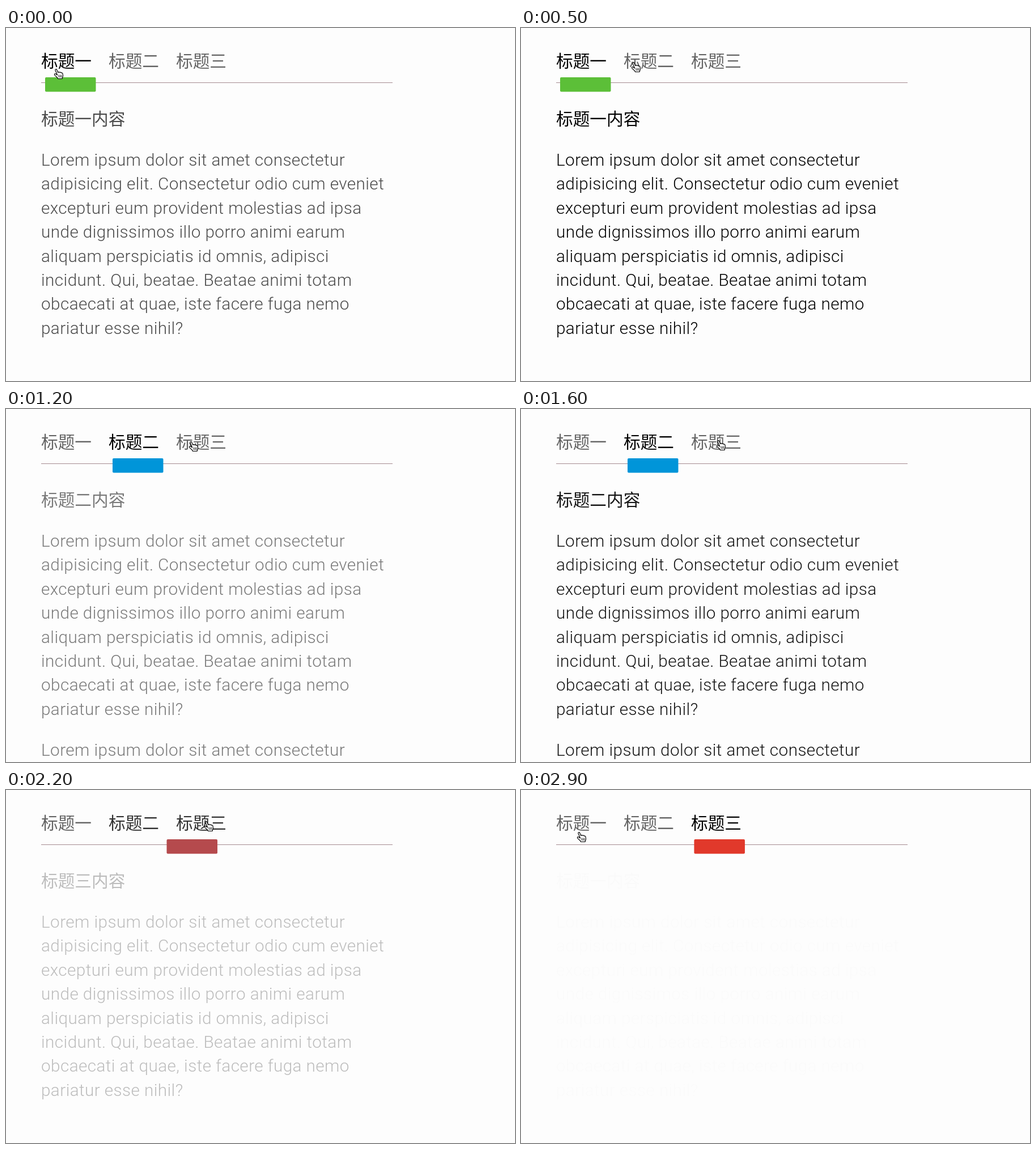
Animation of 898x623 px, one loop 3 s. Source, as an HTML page:

```html
<!DOCTYPE html>
<html lang="zh">
<head>
<meta charset="utf-8">
<title>Tabs</title>
<style>
  html, body { margin: 0; width: 100%; height: 100%; overflow: hidden; background: #fdfdfd; }
  svg { display: block; }
  text { font: 300 29.7px "Noto Sans CJK SC", "Noto Sans CJK", sans-serif; }
  .latin { font-family: Roboto, "Open Sans", sans-serif; letter-spacing: .42px; }
</style>
</head>
<body>
<svg id="stage" width="898" height="623" viewBox="0 0 898 623">
  <g id="tabs"></g>
  <path d="M62 96.5H682" stroke="#a58b90"/>
  <rect id="bar" y="87" width="89.5" height="25.6" rx="2"/>
  <text id="heading" x="62" y="171.3"></text>
  <g id="body"></g>
  <g id="hand" stroke="#000" stroke-width="1.2" stroke-linejoin="round" stroke-linecap="round">
    <path fill="#fff" d="M-3 .5L-6-6.3C-6.6-8.4-4-9-3.3-7.2L-1.3-2.6C-.6-3.9 1.2-3.6 1.6-2.4C2.5-3.5 4-3 4.4-1.7C5.5-2.4 6.8-1.6 7-.3L7.5 3.5L6 8.5H-1.5L-2.2 6.7L-6.7 2.6C-8.6 .8-7-1-5.2 .1L-2.6 2Z"/>
    <path fill="none" stroke-width=".9" d="M-.3 2L.5 6M2.2 2L2.8 6M4.6 2L4.9 6"/>
  </g>
</svg>
<script>
const LOOP = 3000, STEP = 100;
const BAR_MS = 500, FADE_MS = 1000;
const PITCH = 119, LINE = 42.4;
const DIM = 0.6;

const numerals = ['一', '二', '三'];
const colors = [[92, 191, 56], [0, 149, 217], [226, 56, 43]];
const lines = [
  'Lorem ipsum dolor sit amet consectetur',
  'adipisicing elit. Consectetur odio cum eveniet',
  'excepturi eum provident molestias ad ipsa',
  'unde dignissimos illo porro animi earum',
  'aliquam perspiciatis id omnis, adipisci',
  'incidunt. Qui, beatae. Beatae animi totam',
  'obcaecati at quae, iste facere fuga nemo',
  'pariatur esse nihil?'
];

// Time of each click, previous tab, chosen tab
const clicks = [[-700, 2, 0], [683, 0, 1], [1950, 1, 2], [2893, 2, 0]];

// Pointer stops: time, x, y
const stops = [
  [0, 93, 81], [450, 203, 69], [850, 203, 69], [1200, 331, 66],
  [1600, 353, 64], [1900, 358, 64], [2300, 358, 64], [2800, 107, 83], [3000, 107, 83]
];

const $ = id => document.getElementById(id);
const clamp = v => Math.max(0, Math.min(1, v));
const mix = (a, b, p) => a + (b - a) * p;
const smooth = p => p * p * (3 - 2 * p);

// cubic-bezier(.25, .1, .25, 1)
function ease(x) {
  const curve = (a, b, s) => 3 * a * s * (1 - s) ** 2 + 3 * b * s * s * (1 - s) + s ** 3;
  let lo = 0, hi = 1;
  for (let i = 0; i < 24; i++) {
    const mid = (lo + hi) / 2;
    if (curve(.25, .25, mid) < x) lo = mid; else hi = mid;
  }
  return curve(.1, 1, lo);
}

function addText(parent, str, x, y, cls) {
  const el = document.createElementNS('http://www.w3.org/2000/svg', 'text');
  el.textContent = str;
  el.setAttribute('x', x);
  el.setAttribute('y', y);
  if (cls) el.setAttribute('class', cls);
  parent.appendChild(el);
  return el;
}

const tabs = numerals.map((n, i) => addText($('tabs'), '标题' + n, 62 + i * PITCH, 69.2));
lines.forEach((s, i) => addText($('body'), s, 62, 243 + i * LINE, 'latin'));
const second = addText($('body'), lines[0], 62, 612, 'latin');

function pointer(t) {
  const i = stops.findIndex(s => s[0] > t);
  const [t0, x0, y0] = stops[i - 1], [t1, x1, y1] = stops[i];
  const p = smooth((t - t0) / (t1 - t0));
  return [mix(x0, x1, p), mix(y0, y1, p)];
}

function draw(t) {
  const [at, from, to] = clicks.filter(c => c[0] <= t).pop();
  const linear = clamp((t - at) / BAR_MS);
  const moved = ease(linear);
  const fade = clamp((t - at) / FADE_MS);

  $('bar').setAttribute('x', 69 + mix(from, to, moved) * PITCH);
  const rgb = colors[from].map((c, i) => Math.round(mix(c, colors[to][i], moved)));
  $('bar').setAttribute('fill', `rgb(${rgb})`);

  tabs.forEach((tab, i) => {
    const level = i === to ? linear : i === from ? 1 - linear : 0;
    tab.setAttribute('opacity', mix(DIM, 1, level));
  });

  $('heading').textContent = `标题${numerals[to]}内容`;
  $('heading').setAttribute('opacity', fade);
  $('body').setAttribute('opacity', fade);
  second.setAttribute('visibility', to === 1 ? 'visible' : 'hidden');

  $('hand').setAttribute('transform', `translate(${pointer(t)})`);
}

const start = performance.now();
function tick() {
  const t = (performance.now() - start) % LOOP;
  draw(Math.floor(t / STEP) * STEP);
  requestAnimationFrame(tick);
}
tick();
</script>
</body>
</html>
```
